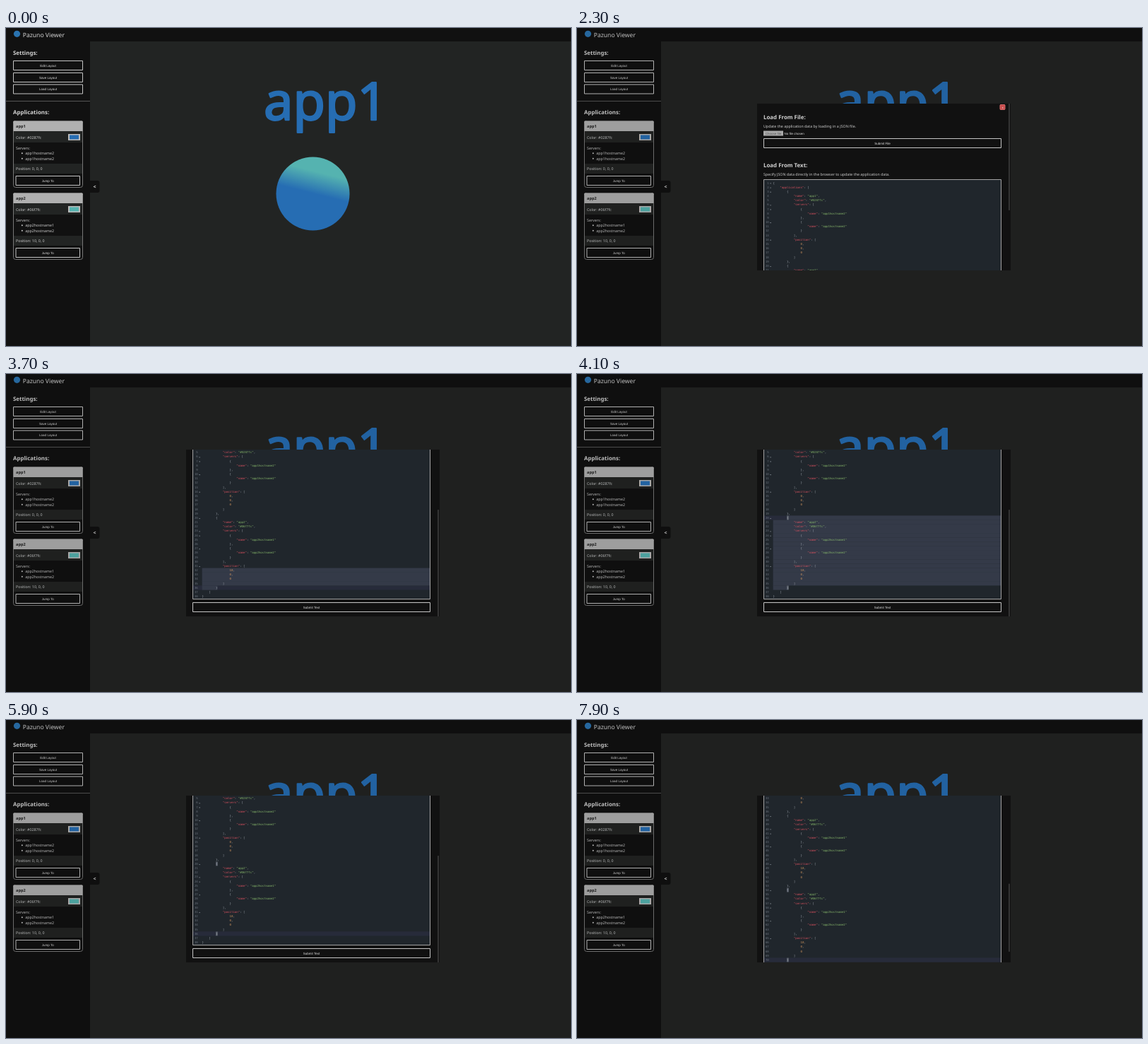
Write an HTML page with a canvas that moves like this. It is 800 px wide and 450 px high and loops after 8 s.

```html
<!DOCTYPE html>
<html lang="en">
<head>
<meta charset="utf-8">
<title>Viewer</title>
<style>
  html, body { margin: 0; width: 100%; height: 100%; overflow: hidden; background: #222423; }
  canvas { display: block; width: 800px; height: 450px; }
</style>
</head>
<body>
<canvas id="stage" width="800" height="450"></canvas>
<script>
const ctx = document.getElementById('stage').getContext('2d');
const LOOP = 8000;
const SANS = '"Noto Sans", "Open Sans", sans-serif';
const UI = '"Liberation Sans", Arial, sans-serif';
const MONO = '"DejaVu Sans Mono", monospace';
const PANEL = '#111', BLUE = '#266db3', TEAL = '#55b3b0';
const MODAL = { x: 255, y: 107, w: 359, h: 236 };
const PITCH = 6.18, CHAR = 2.435, CODE_X = 277.6, EDITOR_Y = 214;

const progress = (t, from, to) => Math.min(1, Math.max(0, (t - from) / (to - from)));
const smooth = p => p * p * (3 - 2 * p);

function rect(x, y, w, h, fill) {
  ctx.fillStyle = fill;
  ctx.fillRect(x, y, w, h);
}

function outline(x, y, w, h, color, radius = 0) {
  ctx.strokeStyle = color;
  ctx.lineWidth = 1;
  ctx.beginPath();
  ctx.roundRect(x + .5, y + .5, w - 1, h - 1, radius);
  ctx.stroke();
}

function circle(x, y, r, fill) {
  ctx.fillStyle = fill;
  ctx.beginPath();
  ctx.arc(x, y, r, 0, Math.PI * 2);
  ctx.fill();
}

function text(str, x, y, size, { color = '#ccc', family = SANS, weight = 400, align = 'left' } = {}) {
  ctx.font = `${weight} ${size}px ${family}`;
  ctx.textAlign = align;
  ctx.fillStyle = color;
  ctx.fillText(str, x, y);
}

function button(label, x, y, w, hovered = false) {
  rect(x, y, w, 14, hovered ? '#b0b0b0' : PANEL);
  outline(x, y, w, 14, hovered ? '#b0b0b0' : '#c4c4c4');
  text(label, x + w / 2, y + 8.6, 4.5, { family: UI, align: 'center', color: hovered ? '#777' : '#e4e4e4' });
}

function heading(str, x, y) {
  text(str, x, y, 7.9, { weight: 700, color: '#d2d2d2' });
}

// JSON document

const entry = (name, color, hosts, position) => [
  '        {',
  `            "name": "${name}",`,
  `            "color": "${color}",`,
  '            "servers": [',
  ...hosts.flatMap((host, i) => [
    '                {',
    `                    "name": "${host}"`,
    '                }' + (i < hosts.length - 1 ? ',' : '')
  ]),
  '            ],',
  '            "position": [',
  ...position.map((n, i) => '                ' + n + (i < 2 ? ',' : '')),
  '            ]',
  '        }'
];
const withComma = lines => [...lines.slice(0, -1), lines.at(-1) + ','];

const first = withComma(entry('app1', '#0287fc', ['app1hostname2', 'app1hostname2'], [0, 0, 0]));
const second = entry('app2', '#06f7fc', ['app2hostname1', 'app2hostname2'], [10, 0, 0]);
const doc = (...parts) => ['{', '    "applications": [', ...first, ...parts.flat(), '    ]', '}'];
const more = withComma(second);

// Editor states: active line and the pair of matched bracket lines
const states = [
  { at: 0, lines: doc(second) },
  { at: 3600, lines: doc(second), active: 36 },
  { at: 4000, lines: doc(second), active: 20, pair: [20, 36] },
  { at: 5400, lines: doc(second), active: 36, pair: [20, 36] },
  { at: 6000, lines: doc(more), active: 36 },
  { at: 6400, lines: doc(more, ['        ']), active: 37 },
  { at: 6600, lines: doc(more, second), active: 53, pair: [37, 53] },
  { at: 7200, lines: doc(more, more), active: 53 },
  { at: 7400, lines: doc(more, more, second), active: 70, pair: [54, 70] }
];

function scrollAt(t) {
  if (t >= 7400) return 306;
  if (t >= 6600) return 201;
  return 133 * smooth(progress(t, 2350, 2700));
}

function tokenColor(token, isKey) {
  if (isKey) return '#d8515f';
  if (token[0] === '"') return '#85b56a';
  return /\d/.test(token) ? '#cf9560' : '#9da4ae';
}

function codeLine(line, y) {
  for (const match of line.matchAll(/"[^"]*"|\d+|[^\s"\d]+/g)) {
    const token = match[0];
    const isKey = token[0] === '"' && line[match.index + token.length] === ':';
    text(token, CODE_X + match.index * CHAR, y, 4.045, { family: MONO, color: tokenColor(token, isKey) });
  }
}

function selection(t) {
  if (t < 3600 || t >= 5400) return;
  const top = Math.round(36 - 16 * progress(t, 3600, 4000));
  for (let n = top; n <= 36; n++) {
    const left = n === 20 ? CODE_X + 8 * CHAR : CODE_X;
    const right = n === 36 ? CODE_X + 9 * CHAR : 600;
    rect(left, EDITOR_Y + 2 + (n - 1) * PITCH, right - left, PITCH + .1, '#343a48');
  }
}

function editor(t, state) {
  const height = 238 + (state.lines.length - 38) * PITCH;
  const rowTop = n => EDITOR_Y + 2 + (n - 1) * PITCH;
  rect(264, EDITOR_Y, 337, height, '#20262c');
  if (state.active) rect(265, rowTop(state.active), 335, PITCH, '#272b3a');
  selection(t);
  for (const n of state.pair || []) {
    rect(CODE_X + 8 * CHAR, rowTop(n) + .2, CHAR + .3, PITCH - .4, '#5b616b');
  }
  state.lines.forEach((line, i) => {
    const y = rowTop(i + 1) + 4.5;
    text(i + 1, 271.8, y, 4.045, { family: MONO, align: 'right', color: '#69717c' });
    if (/[{[]$/.test(line)) {
      ctx.fillStyle = '#808891';
      ctx.beginPath();
      ctx.moveTo(273, y - 1);
      ctx.lineTo(275.2, y - 1);
      ctx.lineTo(274.1, y + .3);
      ctx.fill();
    }
    codeLine(line, y);
  });
  outline(264, EDITOR_Y, 337, height, '#a2a2a2');
  return EDITOR_Y + height;
}

function modal(t) {
  const { x, y, w, h } = MODAL;
  const state = states.findLast(s => s.at <= t);
  const scroll = scrollAt(t);
  ctx.save();
  ctx.beginPath();
  ctx.rect(x, y, w, h);
  ctx.clip();
  rect(x, y, w, h, PANEL);

  ctx.save();
  ctx.translate(0, -scroll);
  rect(599, 108.5, 7, 7, '#c94a4a');
  outline(598.5, 108, 8, 8, '#d06a6a', 1);
  text('x', 602.5, 113.6, 4.5, { family: UI, align: 'center', color: '#eee' });
  heading('Load From File:', 264, 129);
  text('Update the application data by loading in a JSON file.', 264, 140.8, 5.3);
  rect(264, 145.5, 28, 7, '#aaa');
  text('Choose file', 278, 150.7, 4.44, { family: UI, align: 'center', color: '#555' });
  text('No file chosen', 293.5, 150.7, 4.44, { family: UI, color: '#ddd' });
  button('Submit File', 264, 156, 337);
  heading('Load From Text:', 264, 197);
  text('Specify JSON data directly in the browser to update the application data.', 264, 209, 5.3);
  const bottom = editor(t, state);
  button('Submit Text', 264, bottom + 4, 337);
  ctx.restore();

  const total = 369 + (state.lines.length - 38) * PITCH;
  rect(611, y + scroll / total * h, 2, h * h / total, '#343434');
  ctx.restore();
}

function card(y, name, hex, swatch, hosts, position) {
  ctx.save();
  ctx.beginPath();
  ctx.roundRect(10, y, 99, 95, 3);
  ctx.clip();
  rect(10, y, 99, 95, PANEL);
  rect(10, y, 99, 15, '#b0b0b0');
  rect(10, y + 15, 99, 16, '#222423');
  rect(10, y + 61, 99, 14, '#222423');
  ctx.restore();
  outline(10, y, 99, 95, '#777', 3);
  rect(10.5, y + 1, 98, 14, '#b0b0b0');
  text(name, 14, y + 10, 5.6, { weight: 700, color: '#222' });
  text(`Color: ${hex}`, 14, y + 25.6, 5.3);
  rect(88, y + 19, 17, 9, '#bbb');
  rect(90, y + 20.5, 13, 6, swatch);
  text('Servers:', 14, y + 40.8, 5.3);
  hosts.forEach((host, i) => {
    const row = y + 48 + i * 7.5;
    circle(22.8, row - 1.8, 1, '#ccc');
    text(host, 27.3, row, 5.3);
  });
  text(`Position: ${position}`, 14, y + 70, 5.3);
  button('Jump To', 13.5, y + 78, 91.5);
}

function scene() {
  rect(0, 0, 800, 450, '#222423');

  ctx.font = `400 74px ${SANS}`;
  ctx.textAlign = 'left';
  ctx.fillStyle = ctx.strokeStyle = BLUE;
  ctx.lineWidth = 2.4;
  ctx.lineJoin = 'round';
  ctx.fillText('app1', 365, 130);
  ctx.strokeText('app1', 365, 130);

  const shade = ctx.createLinearGradient(438, 203, 430.5, 233);
  shade.addColorStop(0, TEAL);
  shade.addColorStop(1, BLUE);
  circle(434.5, 234.5, 52, shade);
}

function sidebar(hovered) {
  rect(0, 0, 800, 19, PANEL);
  rect(0, 19, 119, 431, PANEL);
  circle(15.5, 8.3, 4.6, '#2a73b0');
  text('Pazuno Viewer', 23.7, 12.5, 8.6, { weight: 300, color: '#d4d4d4' });

  heading('Settings:', 10, 37.5);
  button('Edit Layout', 10, 46, 99);
  button('Save Layout', 10, 63, 99);
  button('Load Layout', 10, 79.5, 99, hovered);
  rect(0, 103, 119, 1, '#555');

  heading('Applications:', 10, 122);
  card(131, 'app1', '#0287fc', BLUE, ['app1hostname2', 'app1hostname2'], '0, 0, 0');
  card(233, 'app2', '#06f7fc', TEAL, ['app2hostname1', 'app2hostname2'], '10, 0, 0');

  ctx.fillStyle = PANEL;
  ctx.beginPath();
  ctx.roundRect(119, 216, 13.5, 17, [0, 3, 3, 0]);
  ctx.fill();
  text('<', 125.6, 227, 7, { weight: 700, align: 'center', color: '#ddd' });
}

function hand(x, y) {
  ctx.fillStyle = '#fff';
  ctx.beginPath();
  ctx.roundRect(x, y, 1.3, 4, .6);
  ctx.roundRect(x - .6, y + 2, 4, 3.6, 1.2);
  ctx.fill();
}

function draw(now) {
  const t = now % LOOP;
  const hovered = t >= 900 && t < 1650;
  const shown = progress(t, 1500, 1800);
  ctx.textRendering = 'geometricPrecision';
  scene();
  sidebar(hovered);
  if (hovered) hand(76, 88);
  if (shown > 0) {
    rect(0, 0, 800, 450, `rgba(0, 0, 0, ${.1 * shown})`);
    ctx.globalAlpha = shown;
    modal(t);
    ctx.globalAlpha = 1;
  }
}

const start = performance.now();
function frame() {
  draw(performance.now() - start);
  requestAnimationFrame(frame);
}
frame();
</script>
</body>
</html>
```
